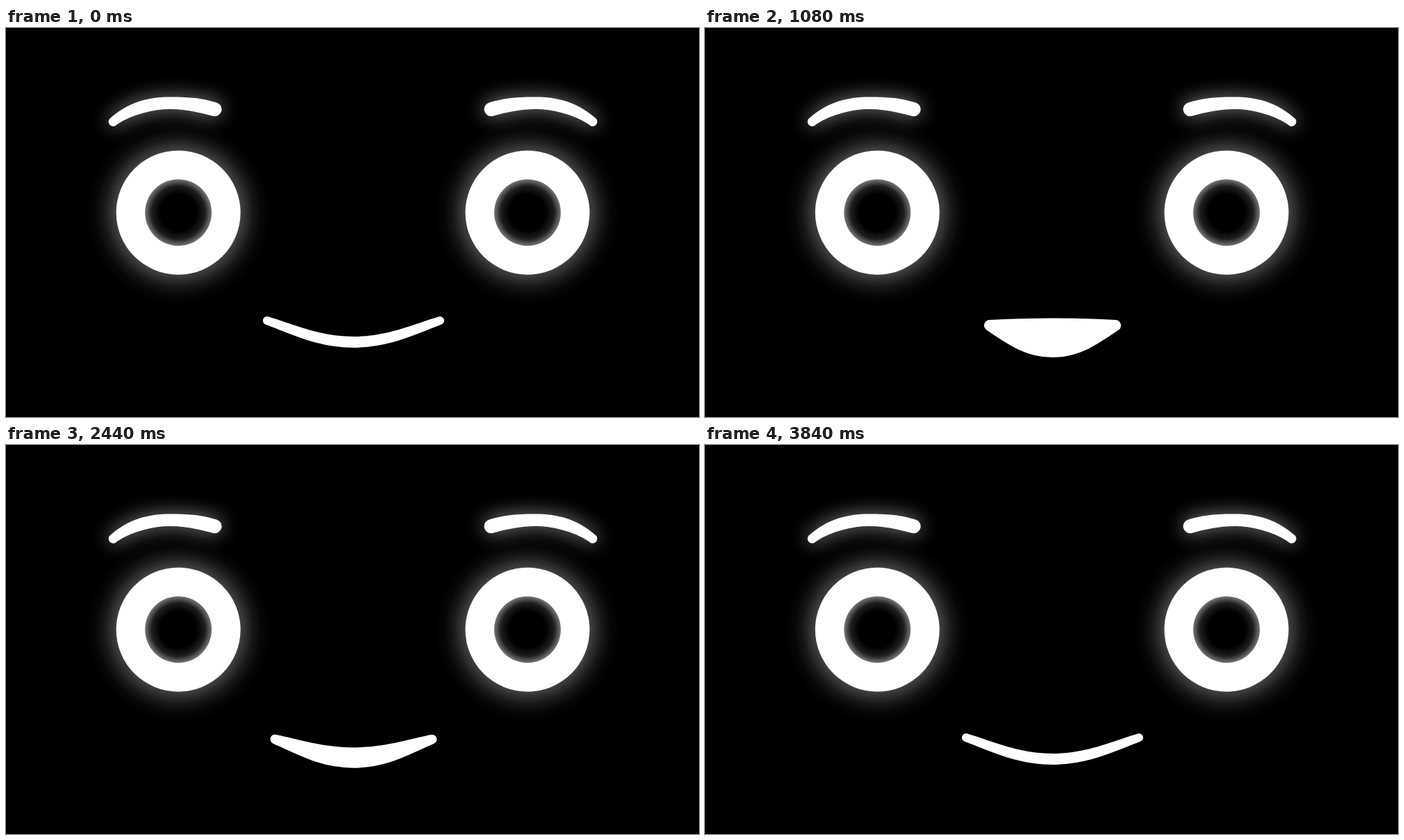
These frames come from a looping animation (998 px wide and 561 px high, 4 s). An HTML page:

```html
<!DOCTYPE html>
<html lang="en">
<head>
<meta charset="utf-8">
<title>Talking face</title>
<style>
  html, body { margin: 0; width: 100%; height: 100%; overflow: hidden; background: #000; }
  svg { display: block; width: 998px; height: 561px; }
</style>
</head>
<body>
<svg viewBox="0 0 998 561">
  <defs>
    <radialGradient id="halo">
      <stop offset=".66" stop-color="#fff" stop-opacity=".26"/>
      <stop offset=".8" stop-color="#fff" stop-opacity=".09"/>
      <stop offset=".89" stop-color="#fff" stop-opacity=".025"/>
      <stop offset="1" stop-color="#fff" stop-opacity="0"/>
    </radialGradient>
    <radialGradient id="pupil">
      <stop offset=".55" stop-color="#000"/>
      <stop offset=".8" stop-color="#1e1e1e"/>
      <stop offset="1" stop-color="#767676"/>
    </radialGradient>
    <filter id="blur" x="-50%" y="-150%" width="200%" height="400%">
      <feGaussianBlur stdDeviation="14"/>
    </filter>
    <path id="arch" fill="#fff" d="M149 131C176 107 204 99.5 237 99.5S284 102 303 107.5
      A10 10 0 0 1 298 127C279 121.5 258 117 236 117S182 124 160 139A6.8 6.8 0 0 1 149 131Z"/>
    <g id="brow">
      <use href="#arch" filter="url(#blur)" opacity=".55"/>
      <use href="#arch"/>
    </g>
    <g id="eye">
      <circle cx="248.2" cy="266.2" r="134.5" fill="url(#halo)"/>
      <circle cx="248.2" cy="266.2" r="89.5" fill="#fff"/>
      <circle cx="248.2" cy="266.2" r="48" fill="url(#pupil)"/>
    </g>
  </defs>
  <rect width="998" height="561"/>
  <g><use class="eye" href="#eye"/><use class="brow" href="#brow"/></g>
  <g transform="translate(999.2 0) scale(-1 1)">
    <use class="eye" href="#eye"/><use class="brow" href="#brow"/>
  </g>
  <path id="mouth" fill="#fff" stroke="#fff" stroke-linejoin="round"/>
</svg>
<script>
const LOOP = 4000, STEP = 40;
const TALK = 480, TALK_END = 3840;
const BLINKS = [560, 1600, 3040], HALF_BLINK = 160, SHUT = 0.06;
const MID_X = 500.5, MID_Y = 280.5;

// Half width, corner height, lip heights at the centre, and how steeply the lower lip leaves the corner.
const smile = { half: 124.5, corner: 422, top: 451, bottom: 455, dip: 17 };
const round = { half: 31.5, corner: 440, top: 386.4, bottom: 490, dip: 16 };
const small = { half: 56.5, corner: 436, top: 402, bottom: 479, dip: 28 };
const wide = { half: 57.5, corner: 436, top: 393, bottom: 490, dip: 32 };
const sounds = [wide, round, small];

const mouth = document.getElementById('mouth');
const eyes = document.querySelectorAll('.eye');
const brows = document.querySelectorAll('.brow');

const mix = (a, b, k) => a + (b - a) * k;

// One lip from corner to corner; dir is 1 from left to right, -1 back.
function lip(half, corner, centre, rise, dir) {
  const at = (f, y) => `${MID_X + dir * f * half} ${y} `;
  return 'C' + at(-0.64, corner + rise) + at(-0.38, centre) + at(0, centre) +
    at(0.38, centre) + at(0.64, corner + rise) + at(1, corner);
}

function drawMouth(t) {
  const open = t < TALK_END ? 1 - Math.abs(1 - 2 * (t % TALK) / TALK) : 0;
  const goal = sounds[Math.floor(t / TALK) % sounds.length];
  const now = key => mix(smile[key], goal[key], open);
  const half = now('half'), corner = now('corner');
  mouth.setAttribute('stroke-width', mix(12, 20, open));
  mouth.setAttribute('d', `M${MID_X - half} ${corner}` +
    lip(half, corner, now('top'), mix(14, -18, open), 1) +
    lip(half, corner, now('bottom'), now('dip'), -1) + 'Z');
}

function draw(t) {
  const shut = Math.max(0, ...BLINKS.map(b => 1 - Math.abs(t - b) / HALF_BLINK));
  const scale = mix(1, SHUT, shut);
  const eyeMove = `translate(0 ${MID_Y * (1 - scale)}) scale(1 ${scale})`;
  const browMove = `translate(0 ${8.7 * shut}) rotate(${-1.9 * shut} 230 118)`;
  eyes.forEach(e => e.setAttribute('transform', eyeMove));
  brows.forEach(b => b.setAttribute('transform', browMove));
  drawMouth(t);
}

const start = performance.now();
function tick() {
  const t = (performance.now() - start) % LOOP;
  draw(Math.floor(t / STEP) * STEP);
  requestAnimationFrame(tick);
}
tick();
</script>
</body>
</html>
```
